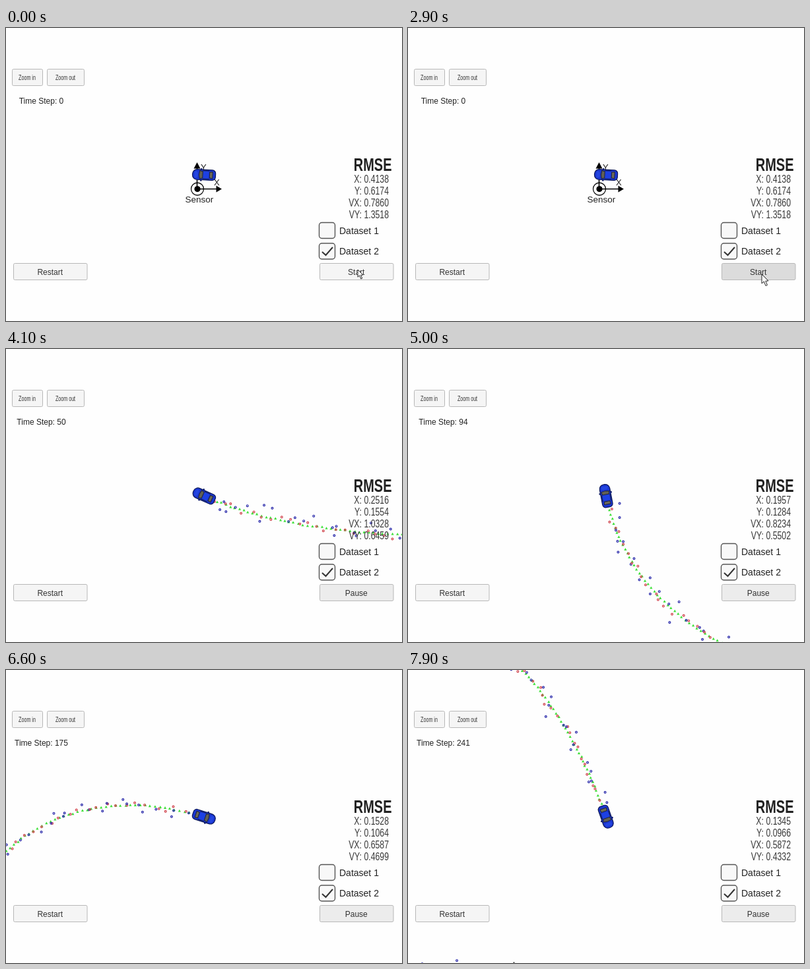
Animation, 600 px wide and 445 px high, one loop 8000 ms. Source, as an HTML page with a canvas:

```html
<!DOCTYPE html>
<html>
<head>
<meta charset="utf-8">
<style>
html, body { margin: 0; overflow: hidden; background: #fefefe; }
canvas { display: block; }
</style>
</head>
<body>
<canvas id="stage" width="600" height="445"></canvas>
<script>
const ctx = document.getElementById('stage').getContext('2d');
const LOOP = 8000, FRAME = 100, RUN = 3100;
const CENTER = { x: 300, y: 223 };

// Key poses of the drive; positions are relative to the starting place, heading in degrees.
const KEYS = [
  { t: RUN, step: 0, x: 0, y: 0, heading: 183 },
  { t: 4100, step: 50, x: -350, y: -62, heading: 204 },
  { t: 5000, step: 94, x: -545, y: -295, heading: 259 },
  { t: 5700, step: 130, x: -470, y: -506, heading: 313 },
  { t: 6600, step: 175, x: -160, y: -569, heading: 378 },
  { t: 7900, step: 241, x: 129, y: -239, heading: 431 }
];

// Errors shrink as a power of the step count; idle is shown before the run.
const ERRORS = [
  { name: 'X', idle: .4138, at50: .2516, power: .398 },
  { name: 'Y', idle: .6174, at50: .1554, power: .302 },
  { name: 'VX', idle: .7860, at50: 1.0328, power: .359 },
  { name: 'VY', idle: 1.3518, at50: .6459, power: .254 }
];

const clamp = (v, lo, hi) => Math.max(lo, Math.min(hi, v));

// The two keys around a value of the given field, and the share between them.
function span(field, value) {
  const end = KEYS.length - 1;
  const v = clamp(value, KEYS[0][field], KEYS[end][field]);
  const i = Math.max(1, KEYS.findIndex(k => k[field] >= v));
  const a = KEYS[i - 1], b = KEYS[i];
  return { a, b, u: (v - a[field]) / (b[field] - a[field]) };
}

function stepAt(t) {
  const { a, b, u } = span('t', t);
  return Math.round(a.step + (b.step - a.step) * u);
}

// Each stretch is a near-circular arc from one heading to the next.
function place(step) {
  const { a, b, u } = span('step', step);
  const rad = Math.PI / 180, ease = u * u * (3 - 2 * u);
  const pull = Math.hypot(b.x - a.x, b.y - a.y) / Math.cos((b.heading - a.heading) * rad / 4) ** 2;
  const along = (axis, trig) => a[axis] + (b[axis] - a[axis]) * ease
    + pull * u * (1 - u) * ((1 - u) * trig(a.heading * rad) - u * trig(b.heading * rad));
  return { x: along('x', Math.cos), y: along('y', Math.sin) };
}

function random(n) {
  const v = Math.sin(n * 127.1 + 11.7) * 43758.5453;
  return v - Math.floor(v);
}
const noise = n => random(n) + random(n + .37) + random(n + .71) - 1.5;

function text(str, x, y, size, { align = 'left', squeeze = 1, color = '#222', weight = '' } = {}) {
  ctx.save();
  ctx.translate(x, y);
  ctx.scale(squeeze, 1);
  ctx.font = `${weight} ${size}px "Liberation Sans", Arial, sans-serif`;
  ctx.textAlign = align;
  ctx.fillStyle = color;
  ctx.fillText(str, 0, 0);
  ctx.restore();
}

function paint(fill, stroke, line = 1) {
  if (fill) {
    ctx.fillStyle = fill;
    ctx.fill();
  }
  if (stroke) {
    ctx.strokeStyle = stroke;
    ctx.lineWidth = line;
    ctx.stroke();
  }
}

function box(x, y, w, h, r, ...style) {
  ctx.beginPath();
  ctx.roundRect(x, y, w, h, r);
  paint(...style);
}

function poly(points, ...style) {
  ctx.beginPath();
  points.forEach(p => ctx.lineTo(...p));
  ctx.closePath();
  paint(...style);
}

function line(points, color, width) {
  ctx.beginPath();
  points.forEach(p => ctx.lineTo(...p));
  paint(null, color, width);
}

function dot(x, y, r, ...style) {
  ctx.beginPath();
  ctx.arc(x, y, r, 0, 7);
  paint(...style);
}

function button(label, x, y, w, size, squeeze = 1, fill = '#f5f5f5') {
  box(x + .5, y + .5, w, 25, 2, fill, '#b8b8b8');
  text(label, x + w / 2, y + 13.3 + size * .37, size, { align: 'center', squeeze, color: '#333' });
}

function checkbox(label, y, checked) {
  box(474.5, y, 24, 24, 4, '#f8f8f8', '#555', 1.4);
  text(label, 505, y + 17, 14);
  if (checked) line([[479, y + 13], [484.5, y + 18], [495, y + 6]], '#333', 2);
}

function drawSensor() {
  dot(290, 244.5, 9.5, null, '#111', 1.3);
  line([[289.5, 212], [289.5, 244.5], [320, 244.5]], '#000', 1.6);
  dot(290, 244.5, 4.6, '#000');
  poly([[289.5, 204], [284.5, 213.5], [294.5, 213.5]], '#000');
  poly([[327, 244.5], [318.5, 239.5], [318.5, 249.5]], '#000');
  text('Y', 295, 216, 13);
  text('X', 315, 239, 13);
  text('Sensor', 271.5, 264.5, 13.5);
}

function drawTrail(step) {
  for (let i = 1; i < step; i++) {
    const p = place(i), x = p.x + noise(i + 900), y = p.y + noise(i + 1300);
    poly([[x, y - 2.1], [x - 2.1, y + 1.7], [x + 2.1, y + 1.7]], '#3fe03a');
  }
  for (let i = 1; i < step; i++) {
    const p = place(i), laser = i % 2, spread = laser ? 6 : 14;
    dot(p.x + noise(i) * spread, p.y + noise(i + 500) * spread, 1.4,
      null, laser ? '#d0404a' : '#2424a8', 1.2);
  }
}

function drawCar(step) {
  const a = place(step - 1), b = place(step + 1);
  ctx.save();
  ctx.translate(CENTER.x, CENTER.y);
  ctx.rotate(Math.atan2(b.y - a.y, b.x - a.x));
  for (const side of [-1, 1]) box(3, side * 8.8 - 1, 2.5, 2, .5, '#101c70');
  box(-17.5, -7.8, 35, 15.6, [5, 7, 7, 5], '#1a36d2', '#0c1858', 1.2);
  box(-7, -5.5, 9, 11, 2, '#1d40e4');
  box(9.5, -5, 5, 10, 3, '#2446e0');
  poly([[2, -5], [6.5, -6.2], [7.5, 0], [6.5, 6.2], [2, 5]], '#626156', '#20243c');
  poly([[-13, -5], [-8.5, -4.4], [-8.5, 4.4], [-13, 5]], '#6d6b58', '#20243c');
  for (const side of [-1, 1]) box(-8, side * 6.3 - .6, 10, 1.2, .5, '#152060');
  ctx.restore();
}

// The pointer dips below the button, then returns to press it.
function drawCursor(t) {
  const k = clamp((t - 1800) / 900, 0, 1), size = k ? 1 : .8;
  const x = 533 + 3 * k, y = 367 + 7 * k + 38 * Math.sin(Math.PI * k);
  const shape = [[0, 0], [0, 14], [3.3, 11], [6, 17.5], [8.4, 16.4], [5.8, 10.3], [10, 10]];
  poly(shape.map(([a, b]) => [x + a * size, y + b * size]), '#fff', '#222');
}

function drawPanel(t, step) {
  const running = t >= RUN, pressed = t >= 2800 && !running;
  button('Zoom in', 9, 62, 46, 11, .65);
  button('Zoom out', 62, 62, 56, 11, .65);
  button('Restart', 11, 357, 111.5, 12);
  button(running ? 'Pause' : 'Start', 475, 357, 111.5, 12, 1,
    pressed ? '#dcdcdc' : running ? '#ececec' : '#f5f5f5');
  text('Time Step: ' + step, 53.5, 115, 12, { align: 'center' });

  text('RMSE', 584.5, 217, 27, { align: 'right', squeeze: .74, weight: 'bold' });
  ERRORS.forEach(({ name, idle, at50, power }, i) => {
    const value = step ? at50 * (50 / Math.max(step, 20)) ** power : idle;
    text(`${name}: ${value.toFixed(4)}`, 580, 234.5 + i * 18, 16.5,
      { align: 'right', squeeze: .745, color: '#383838' });
  });

  checkbox('Dataset 1', 295.5, false);
  checkbox('Dataset 2', 327, true);
}

function draw(now) {
  const t = Math.floor(now % LOOP / FRAME) * FRAME;
  const step = stepAt(t), here = place(step);

  ctx.fillStyle = '#fefefe';
  ctx.fillRect(0, 0, 600, 445);

  ctx.save();
  ctx.translate(-here.x, -here.y);
  drawSensor();
  ctx.translate(CENTER.x, CENTER.y);
  drawTrail(step);
  ctx.restore();

  drawCar(step);
  drawPanel(t, step);
  if (t < RUN + FRAME) drawCursor(t);
}

const start = performance.now();
function tick() {
  draw(performance.now() - start);
  requestAnimationFrame(tick);
}
tick();
</script>
</body>
</html>
```
